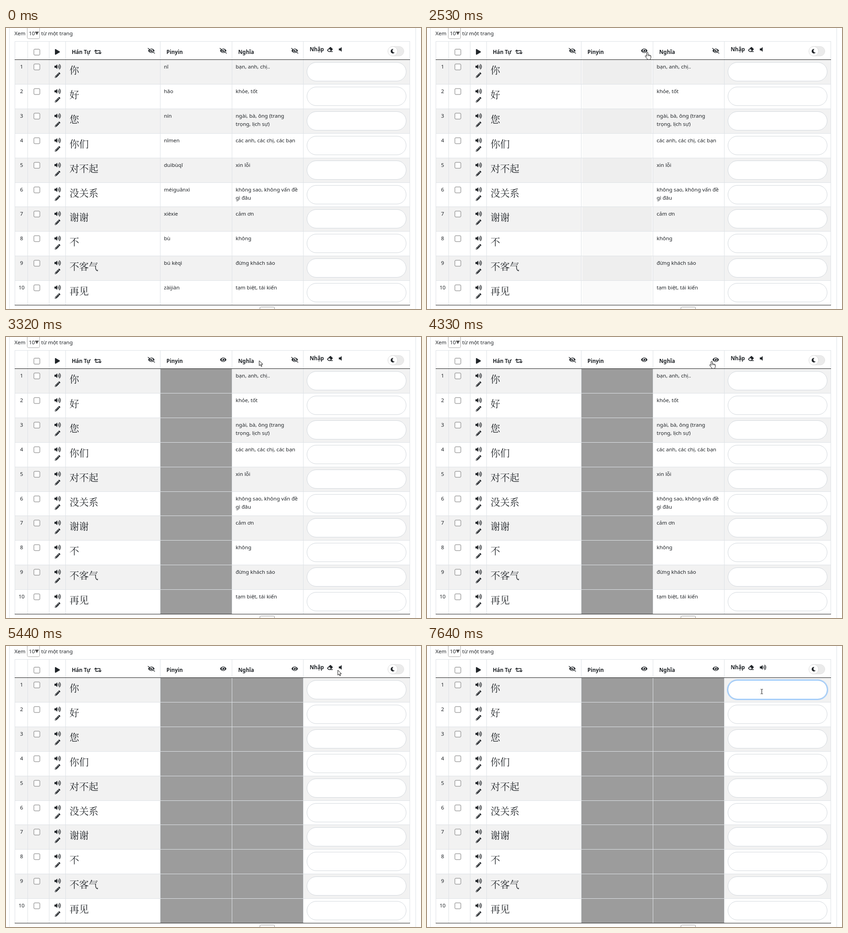
Recreate the animation shown at these times as an HTML page with a canvas. Size 908 by 617 pixels, loop 8 s.

```html
<!DOCTYPE html>
<html lang="vi">
<head>
<meta charset="utf-8">
<title>Hán Tự</title>
<style>
html, body { margin: 0; width: 100%; height: 100%; overflow: hidden; background: #fff; }
canvas { display: block; }
</style>
</head>
<body>
<canvas id="stage" width="908" height="617"></canvas>
<script>
const g = document.getElementById('stage').getContext('2d');
const LOOP = 8000;
const INK = '#212529', LINE = '#dee2e6', STRIPE = '#f2f2f2', COVER = 156;
const SANS = '"Noto Sans", "Open Sans", sans-serif';
const BODY = '11.5px ' + SANS, BOLD = '700 11.5px ' + SANS;
const HANZI = '300 21px "Noto Serif CJK SC", "Noto Sans CJK SC", "Noto Sans CJK", serif';
const COLS = [19, 47, 94, 130, 337, 494, 650, 883];
const ROWS = [
  ['你', 'nǐ', 'bạn, anh, chị..'],
  ['好', 'hǎo', 'khỏe, tốt'],
  ['您', 'nín', 'ngài, bà, ông (trang', 'trọng, lịch sự)'],
  ['你们', 'nǐmen', 'các anh, các chị, các bạn'],
  ['对不起', 'duìbùqǐ', 'xin lỗi'],
  ['没关系', 'méiguānxì', 'không sao, không vấn đề', 'gì đâu'],
  ['谢谢', 'xièxie', 'cảm ơn'],
  ['不', 'bù', 'không'],
  ['不客气', 'bú kèqì', 'đừng khách sáo'],
  ['再见', 'zàijiàn', 'tạm biệt, tái kiến']
];
const HIDE_PINYIN = 2270, HIDE_MEANING = 4330, SOUND_ON = 6030, FOCUS = 7120, BLINK = 7640;

// Cursor legs: start, end, from x, y, to x, y
const LEGS = [
  [330, 1120, 912, 340, 480, 123],
  [1150, 1880, 480, 123, 482, 53],
  [2930, 3940, 482, 53, 614, 52],
  [4040, 4150, 614, 52, 623, 53],
  [4980, 5440, 623, 53, 726, 53],
  [5540, 5950, 726, 53, 730, 47],
  [6250, 6760, 730, 47, 732, 86],
  [6860, 7080, 732, 86, 732, 100]
];

const EYE = new Path2D('M572.5 241.4C518.3 135.6 410.9 64 288 64S57.7 135.6 3.5 241.4a32.4 32.4 0 0 0 0 29.2C57.7 376.4 165.1 448 288 448s230.3-71.6 284.5-177.4a32.4 32.4 0 0 0 0-29.2zM288 400a144 144 0 1 1 144-144 144 144 0 0 1-144 144zm0-240a95.3 95.3 0 0 0-25.3 3.8 47.9 47.9 0 0 1-66.9 66.9A95.8 95.8 0 1 0 288 160z');
const PENCIL = new Path2D('M498 142l-46 46q-9 8-17 0L324 77q-8-8 0-17l46-46q34-28 68 0l60 60q28 34 0 68zM284 100L22 362 0 484q0 30 28 28l122-22 262-262q8-9 0-17L301 100q-8-8-17 0zM124 340q-8-10 0-20l154-154q10-8 20 0t0 20L144 340q-10 8-20 0zM88 424h48v36l-64 12-32-32 12-64h36z');
const ERASER = new Path2D('M498 274q28-34 0-68L338 46q-34-28-68 0L14 302q-28 34 0 68l96 96q14 14 34 14h356q12 0 12-12v-40q0-12-12-12H356zM195 211l138 138-68 67H151l-80-80z');
const MOON = new Path2D('M283 512c79 0 151-36 199-95 7-9-1-21-12-19-124 24-238-72-238-197 0-72 39-139 102-174 9-6 7-20-4-22A258 258 0 0 0 283 0a256 256 0 0 0 0 512z');
const SPEAKER = new Path2D('M215 71l-89 89H24q-24 0-24 24v144q0 24 24 24h102l89 89c15 15 41 4 41-17V88c0-21-26-32-41-17z');
const PLAY = new Path2D('M424 215L72 7C44-10 0 6 0 48v416c0 38 41 60 72 41l352-208c31-18 31-64 0-82z');
const LOOP_ICON = new Path2D('M26 186L128 84 230 186M128 100V384H365M614 326L512 428 410 326M512 412V128H275');
const ARROW = new Path2D('M0 0V11L2.6 8.7 4.4 12.8 6.1 12 4.3 8H8z');
const HAND = new Path2D('M-1.5 1.2q1.5-2 3 0v5q1.4-1 2.3.4 1.4-.9 2.2.6 1.7-.4 1.9 1.2v3.4q0 1.8-1 2.9v1.6h-7v-1.6L-4.4 9.6q-.9-1.8.9-2l2 1.7z');
const BEAM = new Path2D('M-2.5 -5H-.7L0-4.4.7-5H2.5M0-4.4V4.4M-2.5 5H-.7L0 4.4.7 5H2.5');

const clamp = v => Math.max(0, Math.min(1, v));
const easeOut = (u, p) => 1 - Math.pow(1 - clamp(u), p);
const rowTop = i => Math.round(69 + 53.9 * i);
const gray = v => `rgb(${v},${v},${v})`;

function rect(x, y, w, h, color) {
  g.fillStyle = color;
  g.fillRect(x, y, w, h);
}

function text(s, x, y, font = BODY, align = 'left') {
  g.font = font;
  g.textAlign = align;
  g.fillStyle = INK;
  g.fillText(s, x, y);
}

function pill(x, y, w, h, r, fill, stroke, weight = 1) {
  g.beginPath();
  g.roundRect(x, y, w, h, r);
  if (fill) { g.fillStyle = fill; g.fill(); }
  if (stroke) { g.strokeStyle = stroke; g.lineWidth = weight; g.stroke(); }
}

// Runs draw in a 512-high icon grid centred on cx, cy
function icon(cx, cy, width, size, draw) {
  const k = size / 512;
  g.save();
  g.translate(cx - width * k / 2, cy - size / 2);
  g.scale(k, k);
  g.fillStyle = g.strokeStyle = INK;
  draw();
  g.restore();
}

const shape = (path, cx, cy, width, size) =>
  icon(cx, cy, width, size, () => g.fill(path, 'evenodd'));

function eye(cx, cy, open) {
  icon(cx, cy, 576, 12.4, () => {
    g.fill(EYE, 'evenodd');
    if (open) return;
    for (const [dy, w, color] of [[-46, 56, '#fff'], [0, 56, INK]]) {
      g.beginPath();
      g.moveTo(-8, 30 + dy);
      g.lineTo(584, 482 + dy);
      g.lineCap = 'round';
      g.lineWidth = w;
      g.strokeStyle = color;
      g.stroke();
    }
  });
}

function speaker(left, cy, on) {
  icon(left + 7, cy, 576, 12.4, () => {
    g.fill(SPEAKER);
    if (!on) return;
    g.lineWidth = 50;
    g.lineCap = 'round';
    for (const r of [65, 161, 258]) {
      g.beginPath();
      g.arc(295, 256, r, -1, 1);
      g.stroke();
    }
  });
}

const checkbox = cy => pill(61, cy - 6.5, 13, 13, 2, '#fff', '#767676');

function header(t) {
  text('Xem', 18.5, 16);
  pill(46.5, -6.5, 27, 30, 3, '#fff', '#aaa');
  text('10', 50, 16);
  g.fillStyle = '#555';
  g.beginPath();
  g.moveTo(63, 8);
  g.lineTo(72, 8);
  g.lineTo(67.5, 15.5);
  g.fill();
  text('từ một trang', 77, 16);

  checkbox(53);
  shape(PLAY, 112.5, 52.5, 448, 12.4);
  text('Hán Tự', 144, 57, BOLD);
  icon(201, 52.5, 640, 12.4, () => {
    g.lineWidth = 64;
    g.lineCap = g.lineJoin = 'round';
    g.stroke(LOOP_ICON);
  });
  eye(318, 50, false);
  text('Pinyin', 351, 57, BOLD);
  eye(475.3, 50, t >= HIDE_PINYIN);
  text('Nghĩa', 508, 57, BOLD);
  eye(631.7, 50, t >= HIDE_MEANING);
  text('Nhập', 664.5, 51, BOLD);
  shape(ERASER, 708.7, 47, 512, 12.4);
  speaker(728.2, 47, t >= SOUND_ON);

  pill(836, 40.5, 34.5, 21, 10.5, '#ebebeb', '#e3e3e3');
  g.beginPath();
  g.arc(846, 51, 10.5, 0, 7);
  g.fillStyle = '#fff';
  g.fill();
  g.strokeStyle = '#dcdcdc';
  g.stroke();
  shape(MOON, 846, 51, 512, 9.8);
}

// Text leaves first, then the cover widens from the middle of the cell
function cell(col, i, lines, age) {
  const x = COLS[col] + 1, w = COLS[col + 1] - x;
  const y = rowTop(i) + 1, h = rowTop(i + 1) - y;
  const base = i % 2 ? 255 : 242;
  if (age < 200) {
    g.globalAlpha = age < 0 ? 1 : 1 - age / 200;
    lines.forEach((s, n) => text(s, x + 7.5, y + 19 + n * 18, BODY));
    g.globalAlpha = 1;
  }
  if (age < 0) return;
  const late = age > 275, u = (age - 270) / 620;
  const scale = late ? 0.3 + 0.7 * easeOut(u, 2.3) : 0.98;
  const alpha = late ? easeOut(u, 2.8) : 0.05 * clamp(age / 200);
  if (late || age > 200) rect(x, y, w, h, i % 2 ? '#fff' : '#f8f8f8');
  const from = late ? 254 : base;
  const sw = Math.round(w * scale / 2) * 2;
  if (age > 200) {
    rect(scale >= 0.995 ? x : x + (w - sw) / 2, y, scale >= 0.995 ? w : sw, h,
      gray(Math.round(from + (COVER - from) * alpha)));
  }
}

function inputs(t) {
  const f = easeOut((t - FOCUS) / 250, 2);
  for (let i = 0; i < 10; i++) {
    const y = rowTop(i) + 6.5;
    if (i === 0 && f > 0) {
      pill(657.3, y - 1.2, 219.4, 43.4, 21.7, null, `rgba(0,123,255,${0.25 * f})`, 2.5);
    }
    pill(658.5, y, 217, 41, 20.5, '#fff', '#d3d8dd');
    if (i === 0 && f > 0) pill(658.5, y, 217, 41, 20.5, null, `rgba(128,189,255,${f})`);
  }
  if (t >= FOCUS && t < BLINK) rect(667, 86, 1, 21, '#000');
}

function table(t) {
  for (let i = 0; i < 10; i += 2) {
    rect(19, rowTop(i), 864, rowTop(i + 1) - rowTop(i), STRIPE);
  }
  ROWS.forEach(([hanzi, pinyin, ...meaning], i) => {
    const y = rowTop(i);
    text(i + 1, 34, y + 20, BODY, 'center');
    checkbox(y + 16.5);
    speaker(106, y + 16, true);
    shape(PENCIL, 112.8, y + 34.5, 512, 12);
    text(hanzi, 139, y + 31, HANZI);
    cell(4, i, [pinyin], t - HIDE_PINYIN);
    cell(5, i, meaning, t - HIDE_MEANING);
  });
  for (let i = 1; i < 10; i++) rect(19, rowTop(i), 865, 1, LINE);
  rect(19, 29, 865, 1, LINE);
  for (const x of COLS) rect(x, 29, 1, 579, LINE);
  rect(19, 69, 865, 1, '#222');
  rect(19, 608, 865, 1, '#222');
  inputs(t);
}

function cursor(t) {
  let leg = null;
  for (const l of LEGS) if (t >= l[0]) leg = l;
  if (!leg) return;
  const [a, b, x0, y0, x1, y1] = leg;
  const e = easeOut((t - a) / (b - a), 1.6);
  const x = x0 + (x1 - x0) * e, y = y0 + (y1 - y0) * e;
  const within = (l, top, r, bottom) => x >= l && x <= r && y >= top && y <= bottom;
  const onIcon = within(466, 43, 487, 58) || within(621, 43, 641, 58) || within(725, 41, 743, 52);
  const onInput = ROWS.some((_, i) => within(659, rowTop(i) + 7, 875, rowTop(i) + 47));
  g.save();
  g.translate(Math.round(x), Math.round(y));
  g.lineJoin = 'round';
  g.lineWidth = 1;
  g.strokeStyle = '#111';
  if (onInput) {
    g.translate(0.5, 0);
    g.stroke(BEAM);
  } else {
    const path = onIcon ? HAND : ARROW;
    g.fillStyle = '#fff';
    g.fill(path);
    g.stroke(path);
    if (onIcon) {
      g.lineWidth = 0.7;
      g.stroke(new Path2D('M1.5 6v3M3.8 6.6V9M6 7.2V9.4'));
    }
  }
  g.restore();
}

function draw(now) {
  const t = now % LOOP;
  g.lineCap = 'butt';
  g.lineJoin = 'miter';
  rect(0, 0, 908, 617, '#fff');
  rect(7, 0, 1, 617, LINE);
  rect(896, 0, 1, 617, LINE);
  table(t);
  header(t);
  pill(555.5, 612.5, 32, 24, 2, '#fafafa', '#979797');
  cursor(t);
}

let start = null;
function tick(now) {
  if (start === null) start = now;
  draw(now - start);
  requestAnimationFrame(tick);
}
draw(0);
requestAnimationFrame(tick);
</script>
</body>
</html>
```
